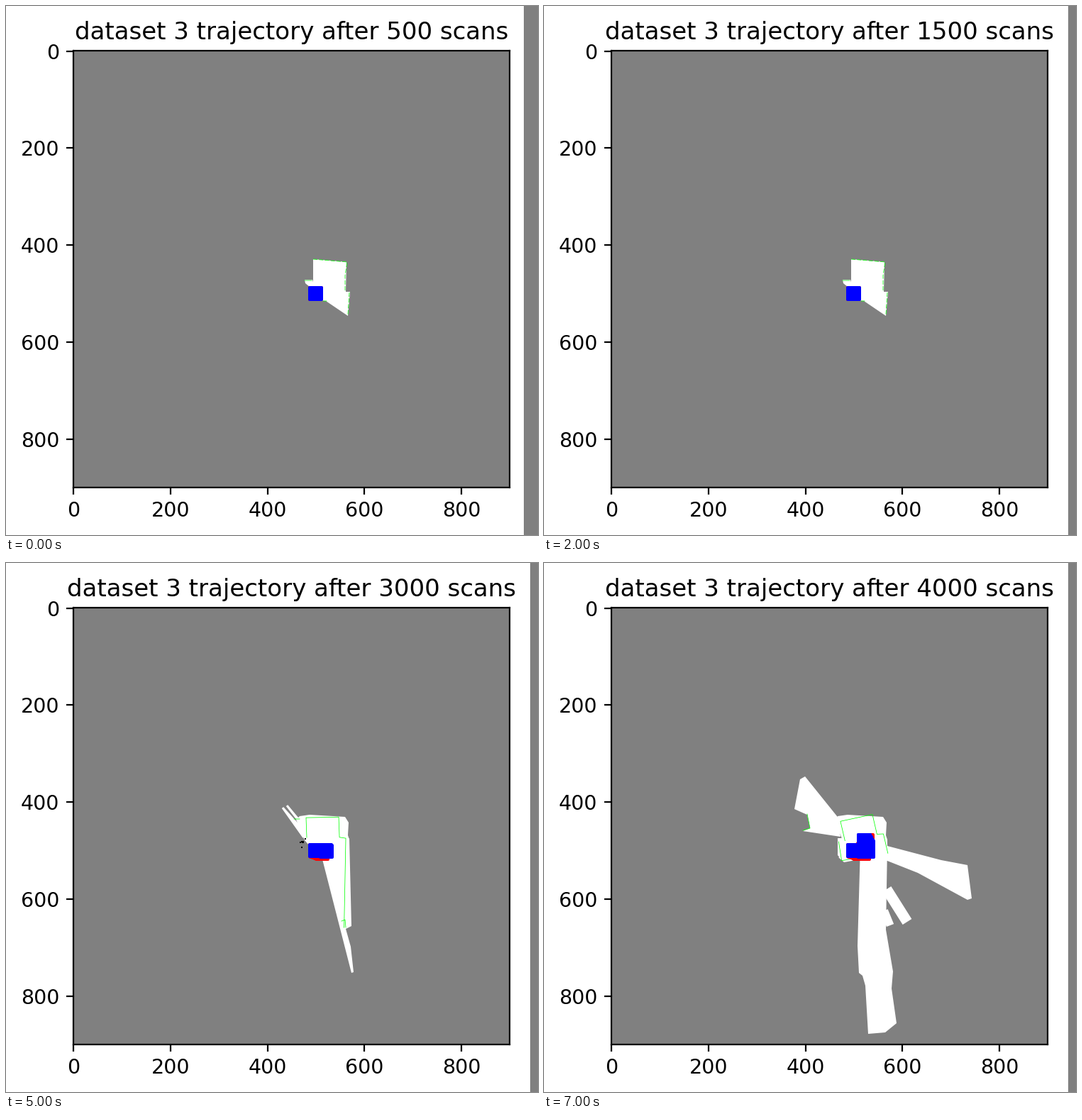
Write a matplotlib script that moves like this. It is 750x746 px and loops after 8 s.

```python
import numpy as np
import matplotlib.pyplot as plt
from matplotlib.animation import FuncAnimation
from matplotlib.lines import Line2D
from matplotlib.markers import MarkerStyle
from matplotlib.patches import Polygon, Rectangle
from matplotlib.transforms import Affine2D

W, H, DPI = 750, 746, 200
LEFT, TOP, SIDE = 94.6, 63.2, 615.8
PX = 72 / DPI  # one pixel in points
GRAY, WHITE, LIME, RED, BLUE = "#808080", "#ffffff", "#00ff00", "#ff0000", "#0000ff"
PIVOT = np.array([447, 388])  # the scanned walls turn around this point

# Way of the robot and of its estimate, and how far along each scan set has got
BLUE_WAY = [(435.7, 404.7), (451, 405.5), (455.5, 406), (455.5, 399.5), (450.5, 390.5)]
RED_WAY = [(435.9, 404.9), (445, 408.5), (449.5, 408.5), (451, 399), (454.5, 390.5)]
PROGRESS = [0, 0, 0, 0, 0, 1, 3, 4]

plt.rcParams["font.family"] = "DejaVu Sans"
fig = plt.figure(figsize=(W / DPI, H / DPI), dpi=DPI, facecolor="white")
ax = fig.add_axes([LEFT / W, 1 - (TOP + SIDE) / H, SIDE / W, SIDE / H], facecolor=GRAY)
ax.set(xlim=(-0.5, 899.5), ylim=(899.5, -0.5),
       xticks=range(0, 900, 200), yticks=range(0, 900, 200))
ax.tick_params(labelsize=10.25)
title = ax.set_title("", fontsize=12.23)
to_screen = Affine2D().scale(1, -1).translate(0, H)
margin = fig.add_artist(Rectangle((730, 0), 40, H, color=GRAY, lw=0,
                                  transform=to_screen))
drawn = []


def area(*points):
    shape = Polygon(points, fc=WHITE, ec="none", lw=0, transform=to_screen,
                    zorder=1, snap=False)
    drawn.append(ax.add_patch(shape))


def beam(start, end, w0, w1):
    """Ray of light that goes from width w0 to width w1."""
    a, b = np.array(start), np.array(end)
    side = np.array([a[1] - b[1], b[0] - a[0]]) / np.hypot(*(b - a)) / 2
    area(a + side * w0, b + side * w1, b - side * w1, a - side * w0)


def wall(points, **style):
    x, y = np.transpose(points)
    line = Line2D(x, y, color=LIME, lw=0.75 * PX, zorder=1.2, transform=to_screen,
                  snap=False, **style)
    drawn.append(ax.add_line(line))


def specks(color, center, spread, count, size):
    x, y = np.random.default_rng(3).normal(center, spread, (count, 2)).T
    drawn.append(ax.add_line(Line2D(x, y, ls="", marker="s", ms=size * PX, mew=0,
                                    color=color, zorder=1.2, transform=to_screen)))


def trail(color, way, progress):
    """Sweep the square robot along its way."""
    t = np.linspace(0, progress, 12 * progress + 1)
    x, y = (np.interp(t, range(len(way)), axis) for axis in zip(*way))
    square = MarkerStyle("s", joinstyle="round")
    drawn.append(ax.add_line(Line2D(x, y, ls="", marker=square, ms=17 * PX,
                                    mew=4 * PX, color=color, zorder=1.5,
                                    transform=to_screen)))


def scan_walls(degrees, reach, alcove=True):
    """The same walls as seen by the scanner, turned by some degrees."""
    a = np.radians(degrees)
    turn = np.array([[np.cos(a), np.sin(a)], [-np.sin(a), np.cos(a)]])
    outlines = [[(-23, 0), (-25, -28), (21, -30.5), (23, -2), (32, -1), (34, reach)]]
    if alcove:
        outlines.append([(-32, 0), (-32, 27), (-21, 27)])
    for points in outlines:
        wall(PIVOT + np.array(points) @ turn.T)


def first_view(depth, inset):
    area((433, 357), (480, 361), (479, 403), (485, 403), (482, depth),
         (451, 416), (440, 415), (433, 395))
    area((421, 386), (432, 386), (435, 396), (428, 396), (422, 391))
    dash = (0, (8, 3))
    wall([(433, 357 + inset), (481, 361 + inset), (478, 380), (478, 402)], ls=dash)
    wall([(484, 404), (482, depth - 2)], ls=dash)
    wall([(421, 387), (431, 387)])
    wall([(447, 416), (452, 416)])


def room():
    area((409, 362), (414, 357), (428, 355), (478, 358), (483, 366), (482, 384),
         (484, 390), (484, 420), (446, 420), (421, 391))


def corridor_view():
    room()
    beam((422, 385), (390, 345), 9, 3)
    beam((412, 362), (396, 342), 4, 3)
    area((484, 388), (487, 512), (479, 516), (486, 541), (490, 577), (487, 578),
         (446, 418))
    scan_walls(-2, 125, alcove=False)
    wall([(406, 361), (414, 361)])
    wall([(473, 505), (478, 503), (479, 514)])
    specks("black", (418.5, 394), (1.5, 2), 9, 2)


def hall():
    room()
    area((414, 388), (446, 388), (446, 417), (418, 417), (414, 412))
    area((446, 400), (442, 540), (444, 578), (449, 582), (453, 596), (457, 664),
         (481, 662), (497, 649), (490, 600), (492, 576), (482, 517), (484, 400))
    beam((483, 460), (512, 506), 15, 15)
    beam((480, 490), (488, 511), 10, 11)


def wide_view():
    hall()
    area((361, 305), (368, 301), (413, 357), (422, 385), (410, 372), (376, 347),
         (376, 341), (362, 328))
    area((484, 405), (598, 427), (598, 461), (594, 466), (530, 436), (484, 419))
    scan_walls(0, 54)
    wall([(377, 341), (377, 348)])
    specks(LIME, (582, 437), (16, 5), 12, 1)
    specks(LIME, (419, 405), (1, 4), 4, 1)


def full_view():
    hall()
    area((361, 305), (368, 301), (413, 357), (418, 386), (365, 378), (375, 374),
         (371, 355), (353, 347))
    area((484, 399), (560, 419), (597, 426), (603, 473), (597, 475), (527, 437),
         (484, 420))
    area((415, 415), (446, 415), (434, 420), (423, 422))
    scan_walls(-9 + 18, 27)
    wall([(365, 377), (375, 374), (371, 354)])


def draw(i):
    while drawn:
        drawn.pop().remove()
    scans = 500 * (i + 1)
    title.set_text(f"dataset 3 trajectory after {scans} scans")
    margin.set_x(730 if scans < 1000 else 739)
    if scans < 2000:
        first_view(437, 0)
    elif scans < 3000:
        first_view(440, 2)
    else:
        {3000: corridor_view, 3500: wide_view, 4000: full_view}[scans]()
    trail(RED, RED_WAY, PROGRESS[i])
    trail(BLUE, BLUE_WAY, PROGRESS[i])
    return drawn


anim = FuncAnimation(fig, draw, frames=len(PROGRESS), interval=1000, repeat=True, blit=False)
plt.show()
```
